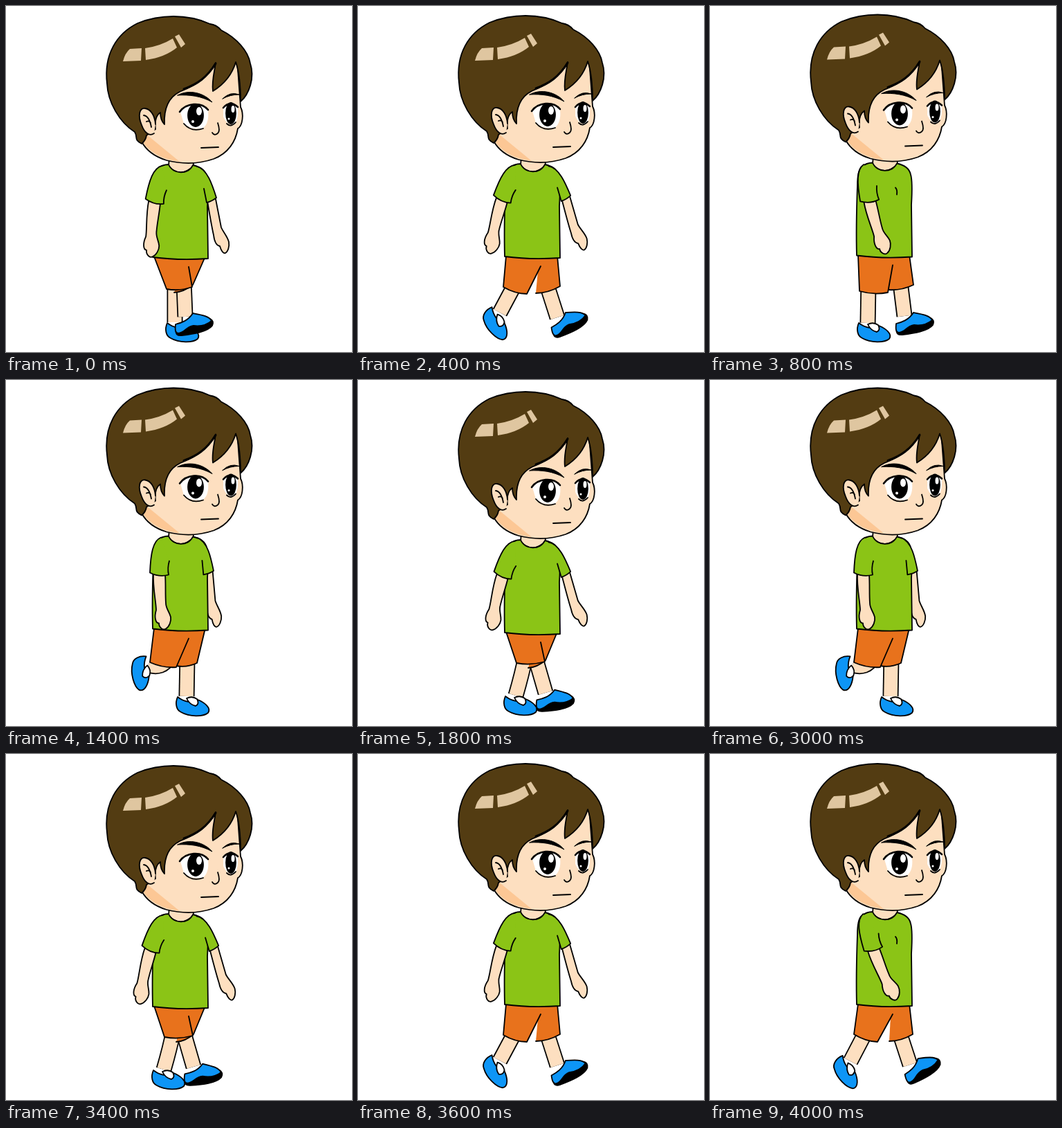
These frames come from a looping animation (500x500 px, 4.2 s). An HTML page:

```html
<!DOCTYPE html>
<html lang="en">
<head>
<meta charset="utf-8">
<title>Walking boy</title>
<style>
  html, body { margin: 0; width: 100%; height: 100%; overflow: hidden; background: #fff; }
  svg { display: block; width: 100%; height: 100%; }
  .line { fill: none; }
  .skin { fill: #fddfc0; }
  .hair { fill: #533c12; }
  .shine { fill: #dfc6a0; stroke: none; }
  .shirt { fill: #8bc416; }
  .shorts { fill: #e8721c; }
  .shoe { fill: #0d95f6; }
  .white { fill: #fff; }
  .none { stroke: none; }
</style>
</head>
<body>
<svg viewBox="0 0 500 500" stroke="#000" stroke-width="1.8" stroke-linejoin="round" stroke-linecap="round">
  <g id="legs"></g>
  <g id="upper">
    <path id="farArm" class="skin" d="M290 276C294 300 297 318 300 331C301 340 304 346 309 347C311 354 314 358 317 357C321 355 323 347 322 341C320 333 314 327 311 320L302 274Z"/>
    <path class="skin" d="M236 218L235 231Q252 250 271 231L270 218Z"/>
    <path class="shirt" d="M235 229C241 244 264 244 270 230C280 232 288 237 290 246Q293 256 291 290L292 365Q250 368 212 363C211 330 212 290 213 262Q213 240 219 235Q226 229 235 229Z"/>
    <path id="farFold" class="line" d="M268 265Q271 268 270 275"/>
    <path id="farSleeve" class="shirt" d="M276 232C291 236 298 258 304 277Q298 282 290 284L286 264"/>
    <g id="nearArm">
      <path class="skin" d="M213 284C212 304 217 325 217 336C214 346 216 355 221 355C221 361 227 366 231 363C236 360 239 352 238 346C236 338 231 334 231 326C230 312 231 300 230 284Z"/>
      <path class="shirt" d="M224 231C212 236 209 255 208 282Q222 289 235 285Q233 275 236 265"/>
    </g>
    <g id="head">
      <path class="skin" d="M196 150L196 196Q206 215 232 223Q268 232 300 221C321 213 332 196 335 177C342 173 344 156 339 146L334 78L300 60L220 110Z"/>
      <path d="M201 184L251 225Q214 220 198 197Z" fill="#fcc795" class="none"/>
      <path class="hair" d="M196 199C184 193 191 190 186 182C164 168 147 139 146 112C141 70 160 40 190 25C222 12 262 11 295 26Q304 27 311 35C333 46 350 65 353 83C360 104 351 128 339 138C339 118 338 99 332 81C327 98 317 112 299 123C297 109 301 96 303 82C288 109 269 116 251 124C235 132 228 148 229 171Q223 165 223 154Q214 160 216 178L203 187Q202 194 196 199Z"/>
      <path class="line" d="M303 83C290 104 276 113 257 120" stroke-width="3"/>
      <path class="skin" d="M214 184C207 189 200 183 196 172C190 158 193 147 201 148C209 149 215 158 216 171"/>
      <path class="line" d="M199 158Q207 159 210 175M203 167Q207 165 209 169"/>
      <path class="shine" d="M169 80Q172 68 179 62L196 61L195 79ZM201 61Q223 58 241 47L247 60Q230 74 202 78ZM244 44L250 41L259 55L253 60Z"/>
      <path class="white none" d="M252 153C262 139 284 140 292 151Q294 170 284 177Q267 179 257 170ZM314 147Q325 137 335 146Q336 166 329 172Q319 172 314 160Z"/>
      <ellipse cx="274" cy="158" rx="11" ry="16"/>
      <ellipse cx="325" cy="155" rx="7" ry="15"/>
      <g class="white none">
        <ellipse cx="279" cy="152" rx="4" ry="6"/><circle cx="270" cy="167" r="2"/>
        <ellipse cx="328" cy="149" rx="2.5" ry="5"/><circle cx="322" cy="163" r="1.5"/>
      </g>
      <path class="line" d="M251 153C260 140 282 138 292 150M314 147Q324 136 335 146" stroke-width="2.6"/>
      <path class="line" d="M257 170Q268 183 285 177M319 170Q325 176 332 168"/>
      <path d="M248 129C264 120 286 125 298 139C282 130 265 128 248 129ZM313 134Q324 123 337 128Q324 128 313 134Z" stroke-width="1"/>
      <path class="line" d="M306 169Q310 181 306 184Q301 188 298 183M282 205L307 204"/>
    </g>
  </g>
</svg>
<script>
  const STEP = 200;
  const ORDER = [0, 1, 2, 3, 4, 5, 6, 7, 0, 1, 2, 2, 4, 5, 6, 7, 0, 1, 2, 4, 5];

  // Shoe shapes around the ankle: flat on the ground, and with the sole showing.
  const SHOES = {
    flat: `<path class="shoe" d="M-13 3C-17 12 -15 22 -8 25C4 32 24 32 31 26C36 19 26 11 16 7C8 13 -4 10 -13 3Z"/>
      <path class="white" d="M0 5Q8 1 15 6Q19 13 13 16Q4 14 0 5Z"/>`,
    sole: `<path d="M-11 21Q-13 30 -3 29C14 27 34 24 41 15Q44 8 38 5Z"/>
      <path class="shoe" d="M-12 13C-13 22 -12 26 -8 26C2 25 2 17 14 15Q30 17 40 8C37 1 24 -1 13 -3C6 8 -4 11 -12 13Z"/>`
  };

  const leg = (shin, shoe, x, y, turn = 0) => ({ shin, shoe, x, y, turn });

  // near / far: arm rotation (far null = hidden); hems: back and front edge of the shorts; legs: far, near.
  const POSES = [
    { dy: 0, near: 9, far: 0, hems: [232, 409, 269, 406, 243, 414, 270, 403],
      legs: [leg("M244 400L244 457", "flat", 246, 455), leg("M257 400L259 449", "sole", 257, 447)] },
    { dy: 2, near: 17, far: -5, hems: [229, 409, 270, 407, 246, 416, 271, 405],
      legs: [leg("M242 400Q237 425 228 456", "flat", 226, 454), leg("M256 400L271 452", "sole", 271, 450, 3)] },
    { dy: -1, near: 18, far: -5, hems: [210, 406, 244, 416, 257, 415, 292, 405],
      legs: [leg("M228 400L205 443", "flat", 205, 442, 44), leg("M272 400L288 450", "sole", 288, 449, -14)] },
    { dy: -3.5, near: 4, far: 5, hems: [208, 408, 246, 415, 246, 413, 278, 409],
      legs: [leg("M234 402Q226 417 206 411", "flat", 209, 411, 72), leg("M262 400L261 458", "flat", 261, 458)] },
    { dy: -2.5, near: -12, far: null, hems: [216, 412, 257, 414, 258, 410, 294, 403],
      legs: [leg("M275 400L281 448", "sole", 281, 446), leg("M229 400L228 458", "flat", 228, 455)] },
    { dy: -1, near: -19, far: null, hems: [208, 405, 242, 416, 259, 415, 293, 405],
      legs: [leg("M273 400L289 449", "sole", 289, 447, -18), leg("M226 400L203 444", "flat", 203, 443, 45)] },
    { dy: -2.5, near: -9, far: null, hems: [208, 407, 245, 416, 250, 414, 284, 408],
      legs: [leg("M268 400L273 457", "flat", 273, 455), leg("M228 402Q222 419 202 428", "flat", 204, 428, 60)] },
    { dy: -3.5, near: 0, far: 6, hems: [208, 408, 246, 415, 246, 413, 276, 409],
      legs: [leg("M262 400L261 457", "flat", 261, 455), leg("M234 402Q226 418 206 412", "flat", 209, 411, 74)] }
  ];

  const get = id => document.getElementById(id);

  function legMarkup({ shin, shoe, x, y, turn }) {
    const tube = (color, width) =>
      `<path class="line" d="${shin}" stroke="${color}" stroke-width="${width}" stroke-linecap="butt"/>`;
    return tube("#000", 23) + tube("#fddfc0", 19.5) +
      `<g transform="translate(${x} ${y}) rotate(${turn})">${SHOES[shoe]}</g>`;
  }

  function shortsMarkup(hems, dy) {
    const top = 362 + dy;
    const [ax, ay, bx, by, cx, cy, ex, ey] = hems;
    const sag = (x1, y1, x2, y2) => `Q${(x1 + x2) / 2} ${(y1 + y2) / 2 + 5} ${x2} ${y2}`;
    return `<path class="shorts" d="M262 ${top}L288 ${top}L${ex} ${ey}${sag(ex, ey, cx, cy)}"/>
      <path class="shorts" d="M262 ${top}L214 ${top}L${ax} ${ay}${sag(ax, ay, bx, by)}L264 ${top + 15}"/>`;
  }

  function show({ dy, near, far, hems, legs }) {
    get("legs").innerHTML = legs.map(legMarkup).join("") + shortsMarkup(hems, dy);
    get("upper").setAttribute("transform", `translate(0 ${dy})`);
    get("nearArm").setAttribute("transform", `rotate(${near} 226 240)`);
    for (const id of ["farArm", "farSleeve"]) {
      get(id).setAttribute("transform", `rotate(${far || 0} 280 240)`);
      get(id).style.display = far === null ? "none" : "";
    }
    get("farFold").style.display = far === null ? "" : "none";
  }

  let current = -1;
  function tick() {
    const pose = ORDER[Math.floor(performance.now() / STEP) % ORDER.length];
    if (pose !== current) show(POSES[current = pose]);
    requestAnimationFrame(tick);
  }
  tick();
</script>
</body>
</html>
```
